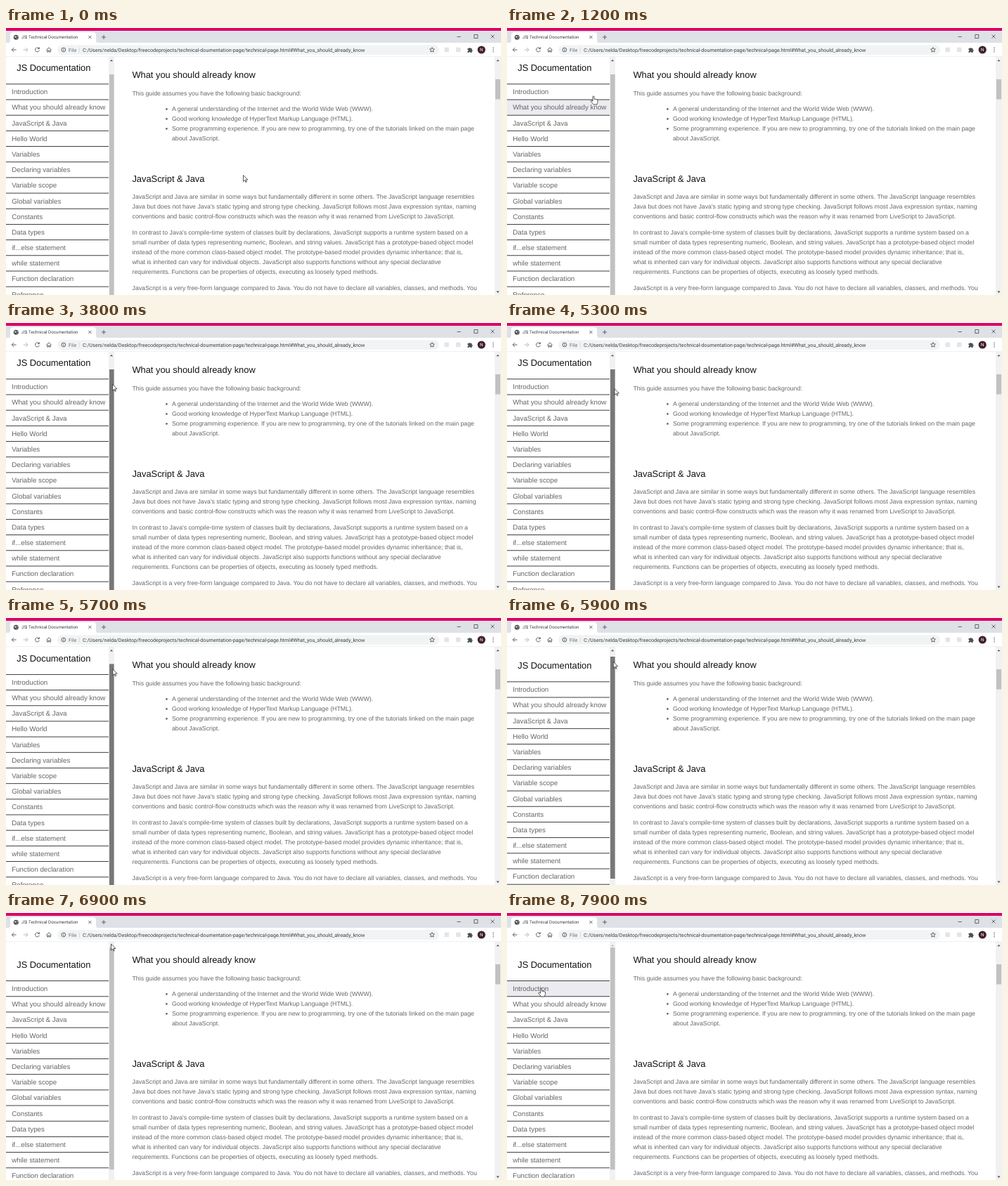
Recreate the animation shown at these times as an HTML page. Size 704x380 px, loop 8 s.

```html
<!DOCTYPE html>
<html lang="en">
<head>
<meta charset="utf-8">
<title>Technical Documentation</title>
<style>
  html, body { margin: 0; width: 100%; height: 100%; overflow: hidden; background: #fff; }
  svg { display: block; width: 100vw; height: 100vh; }
  text { font-family: "Liberation Sans", Arial, sans-serif; text-rendering: geometricPrecision; white-space: pre; }
  .ui { font-family: Roboto, sans-serif; fill: #3c4043; }
  .head { font-size: 12.88px; fill: #111; }
  .body { font-size: 8.76px; fill: #666; }
  .link { font-size: 9.79px; fill: #666; }
  .icon { fill: none; stroke: #5f6368; stroke-width: 1; }
  .win { fill: none; stroke: #333; stroke-width: .7; }
</style>
</head>
<body>
<svg viewBox="0 0 704 380">
  <defs>
    <clipPath id="side"><rect y="41" width="146" height="339"/></clipPath>
  </defs>
  <rect width="704" height="380" fill="#fff"/>

  <g id="main"></g>

  <g clip-path="url(#side)">
    <g id="nav">
      <rect id="hover" width="146" height="22.2" fill="#ebebf0"/>
      <text class="head" x="15.2" y="61.4">JS Documentation</text>
    </g>
  </g>

  <g id="bars">
    <rect x="146" y="41" width="8" height="339" fill="#f1f1f1"/>
    <rect id="thumb" x="147" width="6.6" height="316"/>
    <path id="up" d="M147.9 47.3l2.1-2.4 2.1 2.4z"/>
    <rect x="695" y="41" width="9" height="339" fill="#f1f1f1"/>
    <rect x="696" y="73" width="7" height="28.5" fill="#c1c1c1"/>
    <path d="M697.4 47.3l2.1-2.4 2.1 2.4zM697.4 374.6l2.1 2.4 2.1-2.4z" fill="#505050"/>
  </g>

  <g id="chrome">
    <rect width="704" height="22" fill="#dee1e6"/>
    <rect width="704" height="4" fill="#dc0068"/>
    <path d="M2 21.5q4 0 4-4V10q0-4 4-4h114q4 0 4 4v7.500q0 4 4 4z" fill="#fff"/>
    <rect y="21" width="704" height="20" fill="#fff"/>
    <path d="M0 40.700h704" stroke="#e3e5e8" stroke-width=".6"/>
    <circle cx="14.300" cy="13.200" r="3.500" fill="#4d5156"/>
    <path d="M12 12l1.800-.6.6 1.500-1.100 1.200zM15.200 11l1.300 1-.5 1.500zM14.600 15l1.300-.6-.6 1.300z" fill="#fff"/>
    <text class="ui" x="22" y="15.400" font-size="6.220">JS| Technical Documentation</text>
    <path class="icon" d="M117.400 11l4 4m0-4l-4 4" stroke-width=".8"/>
    <path class="icon" d="M136 13h6m-3-3v6"/>
    <path class="win" d="M641.500 12.500h5.200M665.800 9.500h5v5h-5zM689.500 9.500l5 5m0-5l-5 5"/>

    <path class="icon" d="M14.600 31H8.300m3-3l-3 3 3 3"/>
    <path class="icon" d="M24.800 31h6.300m-3-3l3 3-3 3" style="stroke:#b8bbbf"/>
    <path class="icon" d="M47 29.200a3 3 0 1 0 .4 2.600M47.400 27.400v2.300h-2.300"/>
    <path class="icon" d="M57.500 31.200l3.500-3.300 3.500 3.300M58.700 30.700v3.400h1.500v-2h1.600v2h1.500v-3.400"/>
    <rect x="73" y="24.300" width="543" height="13.600" rx="6.800" fill="#f1f3f4"/>
    <circle class="icon" cx="81.800" cy="31" r="2.900" stroke-width=".7"/>
    <path class="icon" d="M81.800 30.500v2.100m0-3.500v.7" stroke-width=".8"/>
    <text class="ui" x="89" y="33.500" font-size="7.150" style="fill:#6a6e73">File</text>
    <path d="M104.300 27.500v7" stroke="#c4c7cb" stroke-width=".6"/>
    <text class="ui" x="109" y="33.500" font-size="7.150">C:/Users/nelda/Desktop/freecodeprojects/technical-doumentation-page/technical-page.html#What_you_should_already_know</text>
    <path class="icon" stroke-width=".7" d="M606 27.600l1 2.200 2.400.3-1.800 1.600.5 2.400-2.100-1.200-2.100 1.200.5-2.400-1.800-1.600 2.400-.3z"/>
    <rect x="623.500" y="27.700" width="6.500" height="6.500" fill="#e4e5e7"/>
    <rect x="640" y="27.700" width="6.500" height="6.500" fill="#e4e5e7"/>
    <path fill="#4d5156" d="M656.500 29h1.900a1.100 1.100 0 0 1 2.200 0h2v2a1.100 1.100 0 0 1 0 2.200v1.700h-2.200a1 1 0 0 0-2 0h-1.900v-2a1 1 0 0 0 0-2z"/>
    <circle cx="676.200" cy="31" r="5.600" fill="#40202a"/>
    <text class="ui" x="676.200" y="33.200" font-size="6.200" text-anchor="middle" style="fill:#fff">N</text>
    <g fill="#5f6368">
      <circle cx="693" cy="28.300" r=".8"/><circle cx="693" cy="31" r=".8"/><circle cx="693" cy="33.700" r=".8"/>
    </g>
  </g>

  <g id="cursor" fill="#fff" stroke="#222" stroke-width=".75" stroke-linejoin="round">
    <path id="arrow" d="M0 0V9l2.100-2 1.400 3.100 1.300-.6-1.400-3H6.300z"/>
    <path id="hand" d="M-1 5.600V.6a1 1 0 0 1 2 0V4q1-.6 1.900.2 1-.4 1.700.4 1.300-.2 1.400 1.100V8q0 1.600-1 2.600v1H0L-3.600 7.200q-.4-1.200.8-1.400.8 0 1.800 1.200z"/>
  </g>
</svg>

<script>
const $ = id => document.getElementById(id);
const clamp = (v, lo, hi) => Math.min(hi, Math.max(lo, v));

function add(parent, tag, attrs, text) {
  const el = document.createElementNS('http://www.w3.org/2000/svg', tag);
  for (const k in attrs) el.setAttribute(k, attrs[k]);
  if (text) el.textContent = text;
  parent.append(el);
}

// Page text
const LINE = 14.02;
const main = $('main');
function block(x, y, lines) {
  lines.forEach((s, i) => add(main, 'text', { class: 'body', x, y: y + i * LINE }, s));
}
function heading(y, s) { add(main, 'text', { class: 'head', x: 179.4, y }, s); }

heading(71.3, 'What you should already know');
block(179.5, 95.6, ['This guide assumes you have the following basic background:']);
block(236, 118.2, [
  'A general understanding of the Internet and the World Wide Web (WWW).',
  'Good working knowledge of HyperText Markup Language (HTML).',
  'Some programming experience. If you are new to programming, try one of the tutorials linked on the main page',
  'about JavaScript.'
]);
for (let i = 0; i < 3; i++) add(main, 'circle', { cx: 228.4, cy: 115.4 + i * LINE, r: 1.35, fill: '#666' });
heading(219.1, 'JavaScript & Java');
block(179.5, 243.2, [
  'JavaScript and Java are similar in some ways but fundamentally different in some others. The JavaScript language resembles',
  "Java but does not have Java's static typing and strong type checking. JavaScript follows most Java expression syntax, naming",
  'conventions and basic control-flow constructs which was the reason why it was renamed from LiveScript to JavaScript.'
]);
block(179.5, 293.8, [
  "In contrast to Java's compile-time system of classes built by declarations, JavaScript supports a runtime system based on a",
  'small number of data types representing numeric, Boolean, and string values. JavaScript has a prototype-based object model',
  'instead of the more common class-based object model. The prototype-based model provides dynamic inheritance; that is,',
  'what is inherited can vary for individual objects. JavaScript also supports functions without any special declarative',
  'requirements. Functions can be properties of objects, executing as loosely typed methods.'
]);
block(179.5, 372.5, ['JavaScript is a very free-form language compared to Java. You do not have to declare all variables, classes, and methods. You']);

// Sidebar links
const ROW = 22.18, TOP = 79.8;
const links = ['Introduction', 'What you should already know', 'JavaScript & Java', 'Hello World', 'Variables',
  'Declaring variables', 'Variable scope', 'Global variables', 'Constants', 'Data types', 'if...else statement',
  'while statement', 'Function declaration', 'Reference'];
links.forEach((s, i) => {
  const y = TOP + i * ROW;
  add($('nav'), 'rect', { y: y - 0.45, width: 146, height: 0.9, fill: '#2a2a2a' });
  add($('nav'), 'text', { class: 'link', x: 8.2, y: y + 14.5 }, s);
});

// Pointer path: time, x, y
const path = [
  [0, 337.5, 209.5], [100, 330, 206], [900, 168, 128], [1100, 128, 107], [1200, 123, 97.3], [1400, 125, 94],
  [1800, 148, 82], [2500, 150.3, 73.3], [3200, 150.3, 73.3], [4000, 152, 92], [4500, 153, 97],
  [5200, 153, 97], [5300, 153, 93.5], [5900, 151.3, 62.3], [6100, 150.5, 49.5], [6400, 149.5, 44],
  [7200, 149.5, 44], [7700, 48.5, 107.3], [8000, 48.5, 107.3]
];
function pointer(t) {
  const i = Math.max(1, path.findIndex(p => p[0] >= t));
  const [t0, x0, y0] = path[i - 1], [t1, x1, y1] = path[i];
  const k = (t - t0) / (t1 - t0);
  return [x0 + (x1 - x0) * k, y0 + (y1 - y0) * k];
}

const PRESS = 3200, RELEASE = 6700, LOW = 66, HIGH = 49.2;

function draw(t) {
  const [x, y] = pointer(t);
  const held = t >= PRESS && t < RELEASE;
  const top = t < PRESS ? LOW : held ? clamp(y - 7.3, HIGH, LOW) : HIGH;
  const shift = LOW - top;
  const onThumb = x >= 146 && x < 154 && y >= top;

  $('nav').setAttribute('transform', `translate(0 ${shift})`);
  $('thumb').setAttribute('y', top);
  $('thumb').setAttribute('fill', held ? '#787878' : onThumb ? '#a8a8a8' : '#c1c1c1');
  $('up').setAttribute('fill', top > HIGH ? '#505050' : '#b5b5b5');

  // The row highlight trails the pointer by one tick
  const [hx, hy] = pointer(Math.max(0, t - 100));
  const row = Math.floor((hy - shift - TOP) / ROW);
  const lit = !held && hx < 146 && row >= 0;
  $('hover').setAttribute('y', TOP + row * ROW);
  $('hover').style.display = lit ? '' : 'none';

  const overLink = !held && x < 146 && y - shift > TOP;
  $('hand').style.display = overLink ? '' : 'none';
  $('arrow').style.display = overLink ? 'none' : '';
  $('cursor').setAttribute('transform', `translate(${x} ${y})`);
}

const start = performance.now();
function tick() {
  const t = (performance.now() - start) % 8000;
  draw(Math.floor(t / 100) * 100);
  requestAnimationFrame(tick);
}
tick();
</script>
</body>
</html>
```
